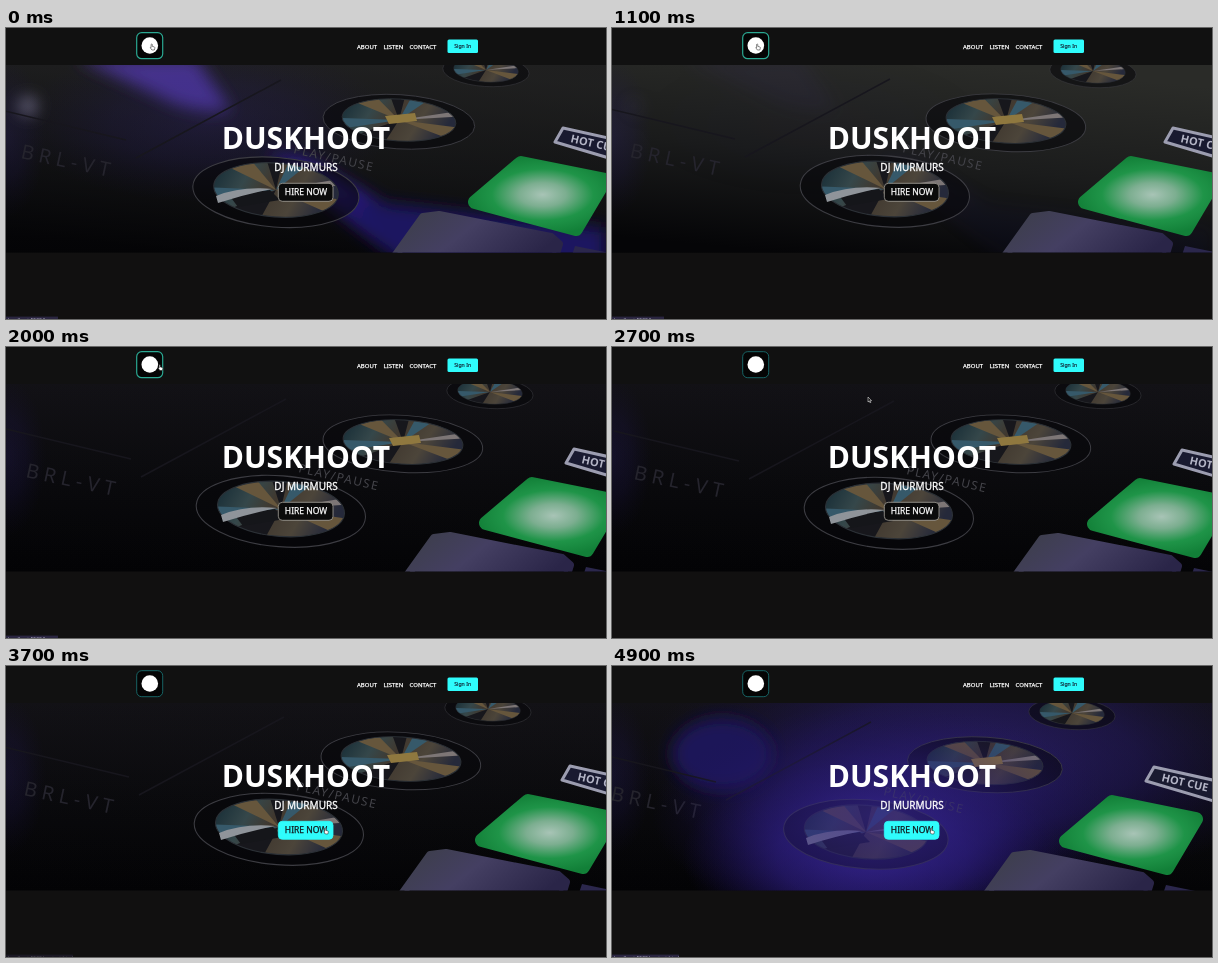
An HTML page for the animation above (5 s loop, 600 px wide and 291 px high).

```html
<!DOCTYPE html>
<html lang="en">
<head>
<meta charset="utf-8">
<title>Landing page</title>
<style>
html, body { margin: 0; width: 100%; height: 100%; overflow: hidden; background: #111010; }
svg { display: block; width: 100%; height: 100%; font-family: "Noto Sans", "Open Sans", sans-serif; }
.mid { text-anchor: middle; }
</style>
</head>
<body>
<svg viewBox="0 0 600 291">
  <defs>
    <clipPath id="hero"><rect y="37" width="600" height="187.5"/></clipPath>
    <clipPath id="round"><ellipse rx="60" ry="24"/></clipPath>
    <filter id="soft" x="-50%" y="-50%" width="200%" height="200%"><feGaussianBlur stdDeviation="8"/></filter>
    <linearGradient id="base" x2="0" y2="1">
      <stop stop-color="#100f14"/><stop offset=".55" stop-color="#08080b"/><stop offset="1" stop-color="#030305"/>
    </linearGradient>
    <linearGradient id="haze" x1=".6" x2=".3" y2="1">
      <stop stop-color="#2a2b28"/><stop offset=".5" stop-color="#1b1c1c"/><stop offset="1" stop-color="#050507"/>
    </linearGradient>
    <linearGradient id="disc" x2="1" y2=".2">
      <stop stop-color="#142a34"/><stop offset=".3" stop-color="#35474a"/><stop offset=".5" stop-color="#40382f"/>
      <stop offset=".75" stop-color="#4c453a"/><stop offset="1" stop-color="#25293a"/>
    </linearGradient>
    <radialGradient id="violet"><stop stop-color="#36268c"/><stop offset=".5" stop-color="#2a1c78" stop-opacity=".7"/><stop offset="1" stop-color="#1c1058" stop-opacity="0"/></radialGradient>
    <radialGradient id="lit" cx=".52" cy=".48" r=".6">
      <stop stop-color="#a8c4b6"/><stop offset=".3" stop-color="#7cae90"/><stop offset=".65" stop-color="#1f9448"/><stop offset="1" stop-color="#128038"/>
    </radialGradient>
    <linearGradient id="dim" x2="1" y2=".4">
      <stop stop-color="#3b3e45"/><stop offset=".5" stop-color="#443f62"/><stop offset="1" stop-color="#2a2548"/>
    </linearGradient>
    <g id="platter" transform="rotate(4)">
      <ellipse rx="80" ry="31" cy="2" fill="#07070a" fill-opacity=".6" stroke="#3c3c42"/>
      <g clip-path="url(#round)">
        <rect x="-60" y="-24" width="120" height="48" fill="url(#disc)"/>
        <path d="M0 0-60-22-25-24zM0 0 60 4 60 20z" fill="#66563c"/>
        <path d="M0 0-60 2-60 14zM0 0 10-24 28-24z" fill="#36596a"/>
        <path d="M0 0 60-14 60-8z" fill="#7d7676"/>
        <path d="M0 0-12 24-52 24zM0 0-10-24 4-24z" fill="#17171c"/>
      </g>
      <ellipse rx="60" ry="24" fill="none" stroke="#2b3036"/>
    </g>
  </defs>

  <g clip-path="url(#hero)">
    <rect y="37" width="600" height="188" fill="url(#base)"/>
    <rect id="grey" y="37" width="600" height="188" fill="url(#haze)"/>
    <ellipse cx="0" cy="110" rx="40" ry="80" fill="url(#violet)" opacity=".2"/>

    <g id="beam">
      <g filter="url(#soft)">
        <path d="M70 30h120l35 52q-40 5-75-15z" fill="#4a3690"/>
        <path d="M260 125 300 130 470 230 390 230z" fill="#2e1c8c"/>
        <path d="M330 170 600 200v40H400z" fill="#1f1560"/>
        <circle cx="22" cy="78" r="9" fill="#6a6880"/>
      </g>
      <ellipse cx="200" cy="95" rx="190" ry="80" fill="url(#violet)" opacity=".25"/>
    </g>
    <g id="wash">
      <ellipse cx="360" cy="95" rx="330" ry="130" fill="url(#violet)" opacity=".65"/>
      <ellipse cx="260" cy="190" rx="190" ry="95" fill="url(#violet)"/>
      <ellipse cx="110" cy="88" rx="50" ry="36" fill="#1d1258" filter="url(#soft)"/>
    </g>

    <g id="deckA">
      <path d="M-140-32 5-110M-275-80-150-50" fill="none" stroke="#17161d" stroke-width="1.5"/>
      <text transform="translate(-256 -32) rotate(12)" font-size="20" letter-spacing="5" fill="#25242d">BRL-VT</text>
      <text transform="translate(17 -37) rotate(13)" font-size="12" letter-spacing="1.4" fill="#44444a">PLAY/PAUSE</text>
      <use id="discA" href="#platter"/>
      <path d="M-47 5-6 0 4 10-38 17z" fill="#15161a"/>
      <path d="M-60 6Q-35-4-4-1-30 4-58 13z" fill="#8f949a"/>
    </g>
    <g id="deckB">
      <use href="#platter" transform="translate(87 -50) scale(.54 .5)"/>
      <use id="discB" href="#platter"/>
      <path d="M-14-4 16-7 18 1-10 4z" fill="#8f783f"/>
    </g>
    <ellipse id="veil" cx="270" cy="150" rx="230" ry="110" fill="url(#violet)"/>

    <g id="pads" stroke-linejoin="round">
      <path d="M-40 11-24 9 88 31 96 38 88 64-78 64z" fill="url(#dim)" stroke="url(#dim)" stroke-width="8"/>
      <path d="M112 40 190 56 190 80 104 64z" fill="#2b274c"/>
      <path d="M12-4 58-43 142-26 113 23z" fill="url(#lit)" stroke="url(#lit)" stroke-width="14"/>
      <path d="M100-78 172-62 163-43 92-64z" fill="#191a30" stroke="#9c9db0" stroke-width="3"/>
      <text transform="translate(107 -64) rotate(13)" font-size="11" font-weight="700" fill="#b4b5c6">HOT CUE</text>
    </g>
  </g>

  <rect width="600" height="37" fill="#111"/>
  <rect id="tile" x="130.7" y="4.7" width="26" height="26" rx="5" fill="#050505"/>
  <circle cx="143.8" cy="17.5" r="8.3" fill="#fff"/>
  <g font-size="6" fill="#fff" stroke="#fff" stroke-width=".25">
    <text x="351" y="20.5">ABOUT</text>
    <text x="377.5" y="20.5">LISTEN</text>
    <text x="403.6" y="20.5">CONTACT</text>
  </g>
  <rect x="441.5" y="11.5" width="30.5" height="13.5" rx="1.5" fill="#2ffcfc"/>
  <text class="mid" x="456.7" y="20" font-size="5.2" fill="#123" stroke="#123" stroke-width=".15">Sign In</text>

  <g class="mid" fill="#fff">
    <text x="300" y="120.5" font-size="30" font-weight="700">DUSKHOOT</text>
    <text x="300" y="143" font-size="10" stroke="#fff" stroke-width=".3">DJ MURMURS</text>
  </g>
  <rect id="button" x="272.3" y="155.3" width="54.7" height="18" rx="4"/>
  <text id="hire" class="mid" x="300" y="167.3" font-size="8.5" stroke-width=".25">HIRE NOW</text>

  <g id="status">
    <rect id="bar" y="288.6" height="3" fill="#2a2540"/>
    <text id="link" x="2" y="293.6" font-size="5" fill="#b8b4cc"></text>
  </g>

  <g id="cursor" stroke="#fff" stroke-width=".5">
    <path id="arrow" d="M0 0v5l1.2-1 .8 1.8.8-.4-.8-1.7h1.6z" fill="#111"/>
    <path id="hand" d="M.6.4q.7-.8 1.2 0v2l2 .5q.7.3.5 1.4l-.5 1.7h-2.4l-1.6-2.2q0-.8.8-.3z" fill="#fff" stroke="#111"/>
  </g>
</svg>
<script>
const $ = id => document.getElementById(id);
const set = (id, attrs) => { for (const k in attrs) $(id).setAttribute(k, attrs[k]); };

// time, deck A x y scale, deck B x y scale, pads x y, beam, wash, grey haze
const scene = [
  [0, 270, 162, 1.04, 393, 92, .95, 457, 178, 1, 0, .6],
  [1100, 273, 161, 1.06, 394, 93, 1, 461, 178, .1, 0, 1],
  [2000, 275, 162, 1.06, 397, 95, 1, 468, 180, 0, 0, .1],
  [2700, 277, 164, 1.06, 399, 95, 1, 470, 181, 0, 0, .1],
  [3700, 273, 161, 1.06, 395, 93, 1, 464, 178, 0, 0, .1],
  [4200, 271, 160, 1.06, 394, 93, 1, 461, 177, 0, .1, .1],
  [4900, 254, 166, 1.03, 373, 97, .97, 442, 179, 0, 1, .1]
];
const pointer = [
  [0, 144.5, 16], [1100, 144, 16], [2000, 152.5, 17.5],
  [2700, 256, 50], [3500, 318, 162], [4900, 318, 162]
];

function sample(keys, t) {
  const i = Math.max(1, keys.findIndex(k => k[0] >= t));
  const a = keys[i - 1], b = keys[i], p = (t - a[0]) / (b[0] - a[0]);
  return a.slice(1).map((v, j) => v + (b[j + 1] - v) * p);
}

function draw(now) {
  const t = Math.floor(now % 5000 / 100) * 100;
  const [ax, ay, as, bx, by, bs, px, py, beam, wash, grey] = sample(scene, t);
  set('deckA', { transform: `translate(${ax} ${ay})` });
  set('discA', { transform: `scale(${as} ${as * 1.08})` });
  set('deckB', { transform: `translate(${bx} ${by})` });
  set('discB', { transform: `scale(${bs} ${bs * .92})` });
  set('pads', { transform: `translate(${px} ${py})` });
  set('beam', { opacity: beam });
  set('wash', { opacity: wash });
  set('veil', { opacity: wash * .7 });
  set('grey', { opacity: grey });

  const [x, y] = sample(pointer, t);
  const onLogo = x < 157 && y < 31, onHire = x > 272 && y > 155;
  const ink = onHire ? '#10181c' : '#fff';
  set('cursor', { transform: `translate(${x} ${y})` });
  set('arrow', { opacity: +!(onLogo || onHire) });
  set('hand', { opacity: +(onLogo || onHire) });
  set('tile', { stroke: onLogo ? '#2ba892' : '#1b7a7c', 'stroke-width': onLogo ? 1.2 : .8 });
  set('button', { fill: onHire ? '#2ffcfc' : '#0b0b0b', stroke: onHire ? '#2ffcfc' : '#a8a49c', 'stroke-width': .8 });
  set('hire', { fill: ink, stroke: ink });

  const late = t >= 3700;
  set('status', { opacity: late ? Math.min(1, .4 + (t - 3700) / 300) : Math.max(0, Math.min(1, (2500 - t) / 300)) });
  set('bar', { width: late ? 67 : 52 });
  $('link').textContent = late ? 'localhost:5500/contact.html' : 'localhost:5500/home';
}

const start = performance.now();
(function loop() {
  draw(performance.now() - start);
  requestAnimationFrame(loop);
})();
</script>
</body>
</html>
```
